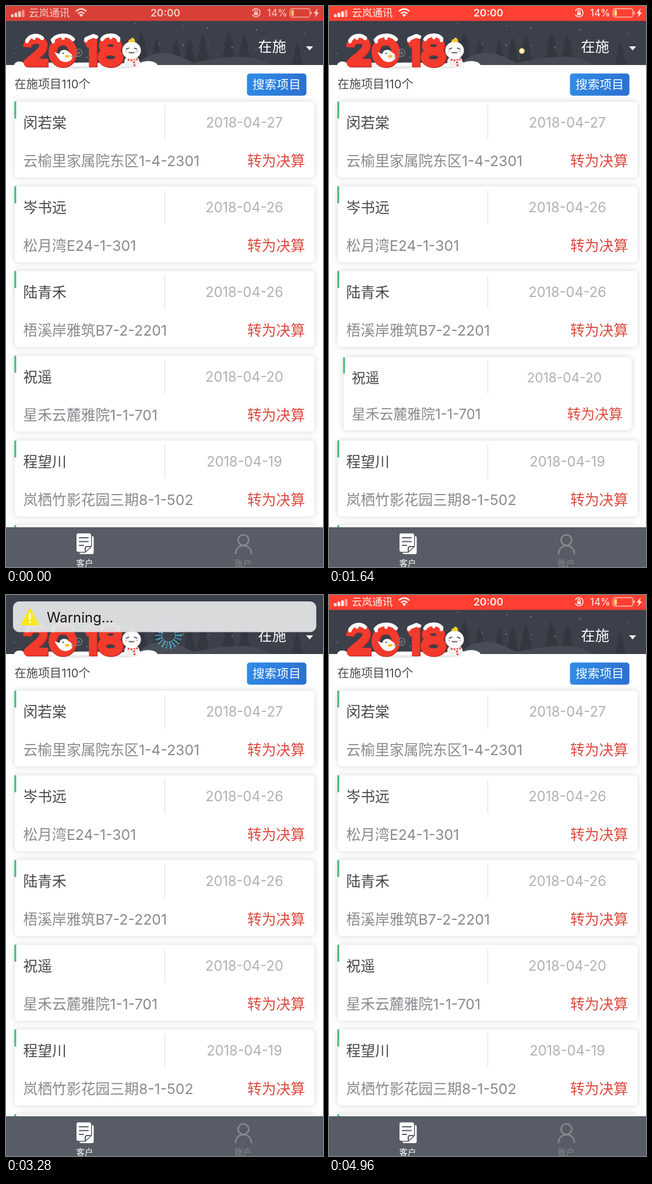
These frames come from a looping animation (544x960 px, 5 s). An HTML page with a canvas:

```html
<!DOCTYPE html>
<html lang="zh-CN">
<head>
<meta charset="utf-8">
<style>
html, body { margin: 0; width: 100%; height: 100%; overflow: hidden; background: #fff; }
canvas { display: block; }
</style>
</head>
<body>
<canvas id="stage" width="544" height="960"></canvas>
<script>
const c = document.getElementById('stage').getContext('2d');
const LOOP = 5000, FIREWORK_PERIOD = 2600;
const FONT = 'Inter, "Noto Sans CJK SC", "Noto Sans CJK JP", "Noto Sans", sans-serif';
const CARDS = [
  ['闵若棠', '2018-04-27', '云榆里家属院东区1-4-2301'],
  ['岑书远', '2018-04-26', '松月湾E24-1-301'],
  ['陆青禾', '2018-04-26', '梧溪岸雅筑B7-2-2201'],
  ['祝遥', '2018-04-20', '星禾云麓雅院1-1-701'],
  ['程望川', '2018-04-19', '岚栖竹影花园三期8-1-502'],
  ['', '', '']
];

const ramp = (t, a, b) => Math.min(1, Math.max(0, (t - a) / (b - a)));
const easeOut = u => 1 - (1 - u) ** 3;
const smooth = u => u * u * (3 - 2 * u);

// y is the vertical centre of the line
function text(str, x, y, size, color, align = 'left', weight = 400) {
  c.font = `${weight} ${size}px ${FONT}`;
  c.textAlign = align;
  c.fillStyle = color;
  c.fillText(str, x, y + size * .36);
}
function rect(x, y, w, h, color, r = 0) {
  c.fillStyle = color;
  c.beginPath();
  c.roundRect(x, y, w, h, r);
  c.fill();
}
function oval(x, y, rx, ry, color) {
  c.fillStyle = color;
  c.beginPath();
  c.ellipse(x, y, rx, ry, 0, 0, 7);
  c.fill();
}
function fill(path, color) {
  c.fillStyle = color;
  c.fill(new Path2D(path));
}
function line(path, color, width, cap = 'round') {
  c.strokeStyle = color;
  c.lineWidth = width;
  c.lineCap = cap;
  c.lineJoin = 'round';
  c.stroke(new Path2D(path));
}

function tree(x, top, h) {
  const w = h * .25;
  fill(`M${x} ${top}l${w * .6} ${h * .45}h${-w * .2}l${w * .6} ${h * .55}h${-2 * w}l${w * .6} ${-h * .55}h${-w * .2}z`, '#323740');
}

function header() {
  rect(0, 0, 544, 101, '#3b404a');
  [[232, 42, 55], [258, 56, 42], [292, 56, 40], [315, 52, 46], [338, 49, 48], [382, 43, 54], [409, 48, 50], [500, 62, 38]]
    .forEach(p => tree(...p));
  fill('M225 101C245 75 282 75 310 92L330 101z', '#484d57');
  fill('M300 101C340 94 370 87 400 87S440 94 455 101z', '#454a54');
  for (let i = 0; i < 26; i++)
    oval((i * 83 + 15) % 540, 30 + (i * 37 + 18) % 64, .7 + i % 3 * .3, .7 + i % 3 * .3, 'rgba(205,212,220,.4)');
}

function artwork() {
  fill('M14 101C16 93 28 94 31 98C60 95 90 98 120 97S180 99 202 98C208 92 227 92 231 97C240 92 258 94 260 101z', '#fff');
  fill('M30 103h58q-25 6-52 3zM80 103h85q-30 7-62 4zM165 103h68q-24 6-55 3z', '#e9e9eb');

  const digits = 'M36 70C37 54 64 53 64 67C64 78 48 86 37 97H72' +
    'M97 60C120 60 120 98 97 98C74 98 74 60 97 60' +
    'M136 65L149 58V104' +
    'M179 58C196 58 196 77 179 77C162 77 162 58 179 58M179 77C199 77 199 98 179 98C159 98 159 77 179 77';
  c.save();
  c.translate(1, 1);
  line(digits, '#c02a22', 14, 'butt');
  c.restore();
  line(digits, '#f43a2d', 13.5, 'butt');

  line('M37 58C42 50 54 48 62 55M80 58C87 48 107 48 115 57M138 56L150 51L155 53M165 57C170 48 187 48 193 56', '#fff', 6.5);
  [[36, 60], [48, 54], [81, 60], [98, 54], [137, 58], [180, 53], [193, 58]].forEach(p => oval(...p, 3, 4, '#fff'));

  // bird and curl
  oval(102, 87, 12, 9, '#fff');
  oval(100, 81, 8, 6, '#fff');
  fill('M83 79l12 4l-5 7z', '#fff');
  oval(98, 81, 1.1, 1.3, '#333');
  oval(105, 86, 4, 2.5, '#f6c52d');
  line('M112 86H126C133 83 131 73 124 74C117 75 119 83 124 82C128 81 126 77 123 79', '#87817d', 1.4);

  // snowman
  oval(216, 95, 13, 10, '#f1f1f2');
  oval(215.5, 76, 16, 15, '#fff');
  fill('M210 62C210 55 214 59 216 54C220 54 222 58 221 62z', '#f8cc36');
  line('M206 74l5-2M220 72l5 2M211 79q2.500 3 4.500 0q2 3 4.500 0', '#444', 1.4);
  oval(206, 78, 2.2, 1.4, '#ffc9c6');
  oval(225, 78, 2.2, 1.4, '#ffc9c6');
  const scarf = 'M207 91Q216 95 226 91M219 93l2 11';
  line(scarf, '#e8463e', 3.2, 'butt');
  c.setLineDash([2, 3]);
  line(scarf, '#fff', 3.2, 'butt');
  c.setLineDash([]);
}

function firework(t, x, y, start, burst, end, colors) {
  if (t < start || t > end) return;
  if (t < burst) {
    const r = 1 + 5 * ramp(t, start, burst);
    oval(x, y, r, r, '#e6cf7c');
    oval(x, y, r * .6, r * .6, '#fff6c4');
    return;
  }
  const u = ramp(t, burst, end), outer = 24 * easeOut(Math.min(1, u * 1.8)), inner = 3 + 17 * ramp(u, .4, 1);
  if (inner >= outer) return;
  c.globalAlpha = 1 - ramp(u, .65, 1);
  c.setLineDash([3.5, 1]);
  for (let i = 0; i < 18; i++) {
    const a = i * Math.PI / 9, dx = Math.cos(a), dy = Math.sin(a);
    line(`M${x + dx * inner} ${y + dy * inner}L${x + dx * outer} ${y + dy * outer}`, colors[i % colors.length], 2.3, 'butt');
  }
  c.setLineDash([]);
  c.globalAlpha = 1;
}

function statusBar(alpha) {
  if (alpha <= 0) return;
  c.save();
  c.globalAlpha = alpha;
  rect(0, 0, 544, 25.5, '#ff4033');
  const ink = '#fff1ee';
  for (let i = 0; i < 4; i++)
    rect(8.5 + i * 6.2, 14 - i * 2.4, 4.6, 5 + i * 2.4, i < 3 ? ink : '#ffa097', 1);
  text('云岚通讯', 39, 12, 17.6, ink);
  line('M120 9Q129 1 138 9M123.5 13Q129 8 134.5 13', ink, 2.6, 'butt');
  fill('M129 19l-3.5-4q3.5-3 7 0z', ink);
  text('20:00', 273.5, 12, 17.5, ink, 'center', 600);
  line('M423 8A7 7 0 1 1 423 15M427 11V9.500a2 2 0 0 1 4 0V11', ink, 1.5);
  rect(425.8, 11, 6.4, 4.8, ink, 1);
  text('14%', 448, 12, 17, ink);
  c.strokeStyle = '#ffc0b8';
  c.lineWidth = 1.3;
  c.beginPath();
  c.roundRect(487.5, 4.5, 34, 14.5, 3.5);
  c.stroke();
  rect(489.5, 6.5, 4.5, 10.5, '#ffd878', 1.5);
  rect(522.5, 9, 2, 5.5, '#ffc0b8', 1);
  fill('M535 4l-7 9h4l-2 7l7-9h-4z', ink);
  c.restore();
}

function card([name, date, place], i, scale) {
  c.save();
  c.translate(272, 228.5 + 145 * i);
  c.scale(scale, scale);
  c.translate(-272, -65);
  c.shadowColor = 'rgba(0,0,0,.17)';
  c.shadowBlur = 10;
  rect(15, 0, 514.5, 130, '#fff', 6);
  c.shadowColor = 'transparent';
  rect(14.3, 0, 3.2, 29, '#45bd78');
  rect(272, 7, 1, 58, '#dcdce0');
  text(name, 29.5, 36.5, 24.8, '#48484a');
  text(date, 409, 36.5, 23.6, '#b1b1b6', 'center');
  text(place, 29.5, 101.5, 24.8, '#8a8a8f');
  text('转为决算', 414, 101.5, 24.8, '#dc4a3e');
  c.restore();
}

function tabBar() {
  rect(0, 892, 544, 68, '#575c66');
  // two stacked pages, the front one with a folded corner
  rect(126, 907, 24.5, 31, '#fff', 3);
  const page = 'M124 902.500h19q3 0 3 3v19l-10 9.500h-12q-3 0-3-3v-25.500q0-3 3-3z';
  line(page, '#575c66', 3);
  fill(page, '#fff');
  line('M126 910h15M126 916.500h15M126 923h7M136 933v-5q0-3 3-3h6', '#575c66', 2);
  text('客户', 135, 954, 14.5, '#fff', 'center');
  line('M407.500 905a9 9 0 1 1-.1 0zM394 937C394 919 421 919 421 937', '#858990', 2.6);
  text('账户', 407, 954, 14.5, '#858990', 'center');
}

function notice(y) {
  if (y < -54) return;
  c.save();
  c.translate(0, y);
  rect(12, 0, 520.5, 52.5, 'rgba(224,224,226,.96)', 11);
  fill('M41 12.500L55.500 40H26.500z', '#f8e71c');
  line('M41 12.500L55.500 40H26.500z', '#f8e71c', 2);
  line('M41 21v9', '#fff', 3);
  oval(41, 35.5, 1.8, 1.8, '#fff');
  text('Warning...', 70, 27, 23.9, '#151517');
  c.restore();
}

function draw(now) {
  const t = now % LOOP, phase = t % FIREWORK_PERIOD;
  const press = smooth(ramp(t, 1480, 1630)) - smooth(ramp(t, 1700, 1860));
  const status = t < 3000
    ? .8 + .2 * ramp(t, 0, 120) - ramp(t, 1880, 2080)
    : ramp(t, 4040, 4190);
  const shown = easeOut(ramp(t, 1900, 2260)) - ramp(t, 3940, 4140) ** 2;

  rect(0, 0, 544, 960, '#fff');
  header();
  firework(phase, 279, 69, 150, 320, 860, ['#45c6dc', '#4a8fd8', '#5fcabb', '#4fa5e6']);
  firework(phase, 331, 77, 1500, 1680, 2200, ['#f0c95c', '#e9925a', '#f3e49a']);
  artwork();
  statusBar(status);

  text('在施', 432.5, 69, 24.2, '#fff');
  fill('M515 69h12l-6 7z', '#fff');
  text('在施项目110个', 14.5, 134, 20.2, '#4b4b4e');
  const blue = c.createLinearGradient(414, 115, 515, 153);
  blue.addColorStop(0, '#2f8de6');
  blue.addColorStop(1, '#2b6fd0');
  rect(413.5, 115.5, 102, 38, blue, 5);
  text('搜索项目', 464.5, 134.5, 20.7, '#fff', 'center');

  CARDS.forEach((data, i) => card(data, i, i === 3 ? 1 - .039 * press : 1));
  tabBar();
  notice(-55 + 66 * shown);
  requestAnimationFrame(draw);
}
requestAnimationFrame(draw);
</script>
</body>
</html>
```
